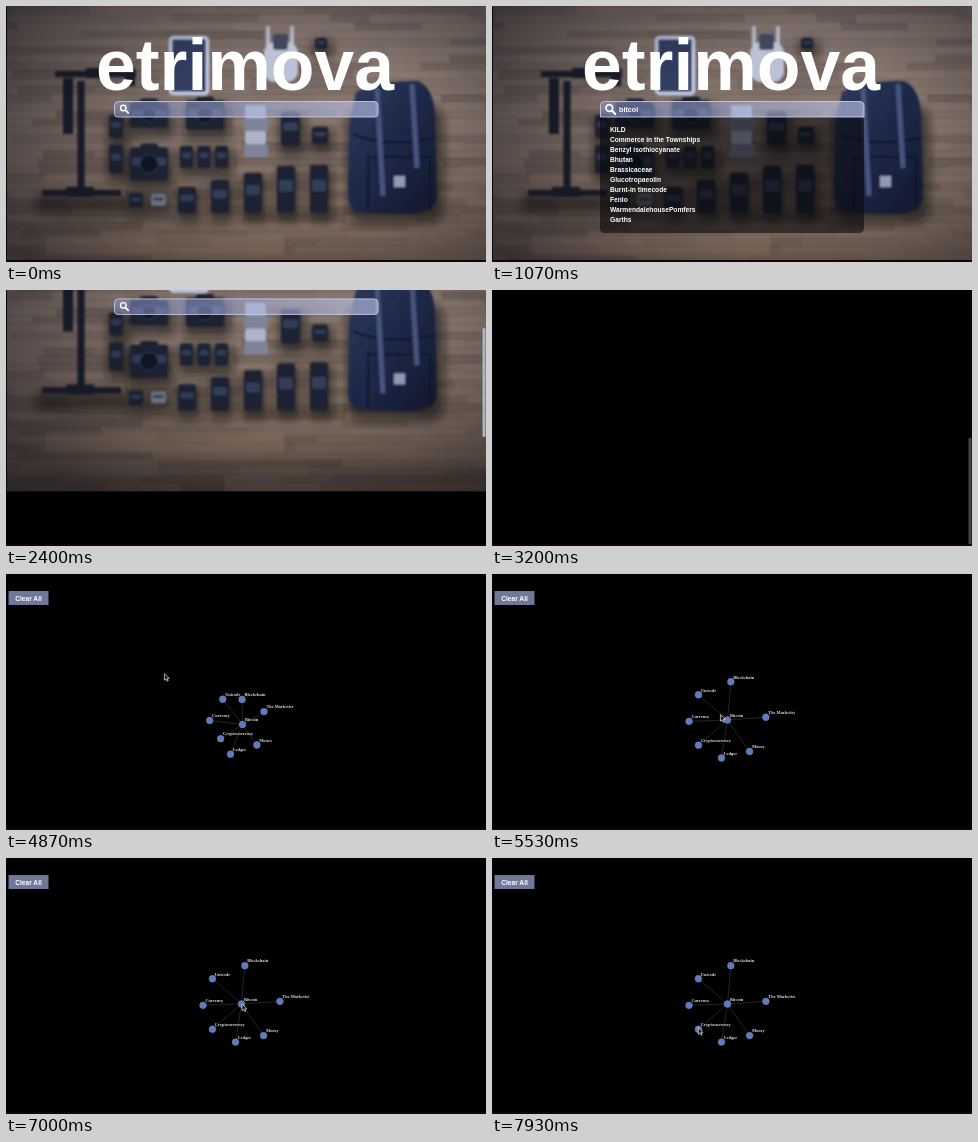
Recreate the animation shown at these times as an HTML page. Size 480x256 px, loop 8 s.

```html
<!DOCTYPE html>
<html lang="en">
<head>
<meta charset="utf-8">
<title>Search and graph</title>
<style>
  html, body { margin: 0; width: 100%; height: 100%; overflow: hidden; background: #000; }
  svg { display: block; width: 480px; height: 256px; }
  text { font-family: "Liberation Sans", Arial, sans-serif; font-weight: bold; fill: #fff; }
  .title { font-size: 71.5px; }
  .query { font-size: 7.2px; }
  .item { font-size: 6.67px; }
  .label { font: bold 4.36px "Liberation Serif", "Times New Roman", serif; fill: #dcdcdc; }
  .link { stroke: #3b3b3b; stroke-width: .6; }
  .node { fill: #5f7abd; stroke: #8090b8; stroke-width: .4; }
</style>
</head>
<body>
<svg viewBox="0 0 480 256">
  <defs>
    <linearGradient id="wood" x2="0" y2="1">
      <stop offset="0" stop-color="#7b6d67"/>
      <stop offset=".5" stop-color="#84736a"/>
      <stop offset=".86" stop-color="#7c6859"/>
      <stop offset="1" stop-color="#59493f"/>
    </linearGradient>
    <radialGradient id="vignette" cx=".6" cy=".42" r=".72">
      <stop offset=".4" stop-color="#15131a" stop-opacity="0"/>
      <stop offset="1" stop-color="#15131a" stop-opacity=".62"/>
    </radialGradient>
    <linearGradient id="bag" x2="1" y2="1">
      <stop offset="0" stop-color="#2f3b5e"/>
      <stop offset=".5" stop-color="#1d2747"/>
      <stop offset="1" stop-color="#131a31"/>
    </linearGradient>
    <linearGradient id="field">
      <stop offset="0" stop-color="#8893cc" stop-opacity=".52"/>
      <stop offset="1" stop-color="#c3c9ea" stop-opacity=".62"/>
    </linearGradient>
    <filter id="soft" x="-5%" y="-5%" width="110%" height="110%"><feGaussianBlur stdDeviation=".8"/></filter>
    <filter id="haze" x="-20%" y="-20%" width="140%" height="140%"><feGaussianBlur stdDeviation="5"/></filter>
    <clipPath id="photo"><rect width="480" height="288"/></clipPath>
  </defs>
  <g id="page">
    <g clip-path="url(#photo)">
      <rect width="480" height="288" fill="url(#wood)"/>
      <g id="boards" filter="url(#soft)"></g>
      <g id="shade" filter="url(#haze)" opacity=".55" fill="#0b0a10">
        <rect x="30" y="188" width="95" height="20"/>
        <rect x="340" y="100" width="98" height="118" rx="16"/>
      </g>
      <g id="things" filter="url(#soft)">
        <!-- stabiliser -->
        <g fill="none" stroke="#181b2a">
          <path d="M49 68H130M36 187H115" stroke-width="6"/>
          <path d="M75 75V190" stroke-width="7"/>
          <path d="M62 72V128M80 67H102M124 62V80M60 186H88" stroke-width="10"/>
        </g>
        <!-- tablet and controller -->
        <rect x="164.500" y="31.500" width="37" height="56" rx="3" fill="#323e62" stroke="#c3cce8" stroke-width="3.500"/>
        <path d="M262 20V44M286 20V44" stroke="#b6bbcc" stroke-width="4"/>
        <rect x="258" y="36" width="34" height="40" rx="11" fill="#bcc2d6"/>
        <rect x="267" y="28" width="15" height="16" rx="3" fill="#3f4760"/>
        <!-- backpack -->
        <path fill="url(#bag)" d="M350 86Q372 74 412 75Q428 82 429 110L431 192Q428 208 404 208L356 207Q342 204 342 188L343 122Z"/>
        <path fill="none" stroke="#0f1528" stroke-width="2" d="M347 128Q380 142 428 132M362 204V151H424V204"/>
        <path fill="none" stroke="#46557f" stroke-width="5" d="M371 82L377 190M406 78L411 162"/>
        <rect x="388" y="170" width="11" height="11" fill="#8f9ab8"/>
      </g>
      <rect width="480" height="288" fill="url(#vignette)"/>
    </g>
    <text class="title" x="90" y="84">etrimova</text>
    <g id="panel">
      <path d="M108 111H372V222Q372 227 367 227H113Q108 227 108 222Z" fill="#08070c" fill-opacity=".58"/>
    </g>
    <path id="bar" fill="url(#field)" stroke="#c6cbe6" stroke-width=".9"/>
    <g id="lens" fill="none" stroke="#fff" stroke-linecap="round">
      <circle r="2.900" stroke-width="1.400"/>
      <path d="M2.400 2.400L5.200 5.200" stroke-width="1.900"/>
    </g>
    <text id="query" class="query" x="127" y="106"></text>
  </g>
  <rect id="thumb" x="476.500" width="3" height="109" rx="1.500" fill="#b0b2c8"/>
  <g id="graph">
    <rect x="2.500" y="17" width="40" height="14" fill="#71769b"/>
    <text x="22.500" y="26.500" font-size="6.650" text-anchor="middle">Clear All</text>
  </g>
  <path id="cursor" d="M0 0V6.600L1.600 5.200L2.700 7.600L3.800 7.100L2.800 4.800H4.800Z" fill="#111" stroke="#e8e8e8" stroke-width=".7"/>
  <rect y="254" width="480" height="2" fill="#14040a"/>
  <rect width="1" height="256" fill="#08070a"/>
</svg>
<script>
const LOOP = 8000;
const $ = id => document.getElementById(id);

function set(el, attrs) {
  for (const k in attrs) el.setAttribute(k, attrs[k]);
}
function add(parent, tag, attrs, text) {
  const el = document.createElementNS("http://www.w3.org/2000/svg", tag);
  set(el, attrs);
  if (text) el.textContent = text;
  return parent.appendChild(el);
}
const box = (parent, x, y, width, height, rx, fill) =>
  add(parent, "rect", { x, y, width, height, rx, fill });

// ---- backdrop ----
let seed = 11;
const rand = () => (seed = (seed * 16807) % 2147483647) / 2147483647;

const boards = $("boards"), PLANK = 8;
for (let y = 0; y < 288; y += PLANK) {
  for (let x = -rand() * 90; x < 480;) {
    const width = 40 + rand() * 100, tone = rand() - .5;
    add(boards, "rect", { x, y, width, height: PLANK,
      fill: tone > 0 ? "#c8ae9c" : "#1a1415", opacity: Math.abs(tone) * .26 });
    x += width;
  }
  add(boards, "rect", { x: 0, y, width: 480, height: .8, fill: "#1b1515", opacity: .22 });
}
add(boards, "rect", { x: 40, y: 230, width: 238, height: 19, fill: "#b79a82", opacity: .28 });

const things = $("things");

// a dark piece of kit with a soft shadow and a lighter band
function kit(x, y, w, h, fill = "#1b2033") {
  box($("shade"), x - 2, y + 2, w + 8, h + 8, 4);
  box(things, x, y, w, h, 3, fill);
  box(things, x + 2, y + h * .3, w - 4, h * .25, 2, "#333d5a");
}
function camera(cx, cy, h) {
  kit(cx - 19, cy - h / 2, 38, h);
  box(things, cx - 9, cy - h / 2 - 4, 18, 9, 3, "#1b2033");
  add(things, "circle", { cx, cy, r: h * .28, fill: "#0f1320", stroke: "#35415f" });
}
camera(143, 109, 25);
camera(199, 109, 29);
camera(143, 158, 33);
for (let i = 0; i < 5; i++) {
  const h = Math.min(48, 26 + i * 7);
  kit(172 + i * 33, 207 - h, 18, h);
}
for (let i = 0; i < 3; i++) kit(174 + i * 17.5, 140, 13, 22);
for (let i = 0; i < 2; i++) kit(103, 109 + i * 30, 14, 23 + i * 5);
kit(275, 106, 19, 34);
kit(306, 121, 16, 17);
kit(309, 32, 12, 11);
kit(123, 187, 14, 15);
kit(145, 188, 15, 12, "#787e92");
for (let i = 0; i < 4; i++) {
  box(things, 239 - i % 2, 99 + i * 13, 21 + i % 2 * 3, 13, 2, i % 2 ? "#7d849a" : "#aeb4c8");
}

// ---- search ----
const first = ["KILD", "Commerce in the Townships", "Benzyl isothiocyanate", "Bhutan",
  "Brassicaceae", "Glucotropaeolin", "Burnt-in timecode", "Fenlo",
  "WarmendalehousePomfers", "Garths"];
const second = ["Bitcoin", "History of bitcoin", "Bitcoin Cash",
  "Legality of bitcoin by country or territory", "Cryptocurrency", "Bitcoin network",
  "Haruki Minasawa", "Litecoin", "Bitcoin Core", "List of bitcoin companies"];
const rows = first.map((_, i) =>
  add($("panel"), "text", { class: "item", x: 118, y: 126.2 + i * 10 }));
const TYPE = 130, KEY = 178, LIST = 600, REFRESH = 1400, PICK = 2130;

function drawSearch(t) {
  const open = t >= TYPE && t < PICK;
  const listed = t >= LIST && t < PICK;
  const typed = open ? 1 + Math.floor((t - TYPE) / KEY) : 0;
  $("query").textContent = "bitcoin".slice(0, typed);
  $("panel").style.display = listed ? "" : "none";
  const names = t < REFRESH ? first : second;
  rows.forEach((row, i) => { row.textContent = names[i]; });
  const r = listed ? 0 : 3.5;
  set($("bar"), { d: `M108.5 99.5q0 -4 4 -4H368q4 0 4 4V${111 - r}q0 ${r} ${-r} ${r}H${108.5 + r}q${-r} 0 ${-r} ${-r}Z` });
  set($("lens"), { transform: `translate(117.3 102) scale(${open ? 1.15 : .95})` });
}

// ---- motion helpers ----
const clamp = u => Math.min(1, Math.max(0, u));
const span = (t, a, b) => clamp((t - a) / (b - a));
const smooth = u => u * u * (3 - 2 * u);
const mix = (a, b, u) => a + (b - a) * u;

// ---- scroll ----
const BEGIN = 2337, END = 2530, DEPTH = 337;

function drawScroll(t) {
  const shift = DEPTH * smooth(span(t, BEGIN, END));
  set($("page"), { transform: `translate(0 ${-shift})` });
  set($("thumb"), { y: shift * .4375, opacity: t < BEGIN ? 0 : 1 - span(t, 3090, 3270) });
}

// ---- graph ----
const SHOW = 4870, SETTLED = 5670, PULLED = 6270, FREED = 7000;
const RING = 38.5, STIFF = .5;
const PULL = { x: 6, y: -5 };

// first angle, first radius, resting angle
const spokes = {
  Blockchain: [-91, 25, -85],
  "The Marketist": [-31, 25, -4],
  Money: [55, 25, 55],
  Ledger: [112, 32, 99],
  Cryptocurrency: [147, 26, 139],
  Currency: [187, 33, 178],
  Unicode: [232, 32, 221]
};
const graph = $("graph");
const nodes = ["Bitcoin", ...Object.keys(spokes)].map(name => ({ name, spoke: spokes[name] }));
for (const n of nodes) n.link = add(graph, "line", { class: "link" });
for (const n of nodes) n.dot = add(graph, "circle", { class: "node", r: 3.4 });
for (const n of nodes) n.label = add(graph, "text", { class: "label" }, n.name);

// outer nodes give way as the hub is dragged towards them
function place(spoke, centre, drag, grow) {
  const [a0, r0, a1] = spoke;
  const a = mix(a0, a1, grow) * Math.PI / 180;
  const [c, s] = [Math.cos(a), Math.sin(a)];
  const r = mix(r0, RING, grow) - STIFF * (c * drag.x + s * drag.y);
  return { x: centre.x + c * r, y: centre.y + s * r };
}

function drawGraph(t) {
  graph.style.display = t >= SHOW ? "" : "none";
  const grow = 1 - (1 - span(t, SHOW, SETTLED)) ** 3;
  const pull = smooth(span(t, SETTLED, PULLED)) - smooth(span(t, PULLED, FREED));
  const centre = { x: mix(236.5, 235.5, grow), y: mix(150.5, 146, grow) };
  const drag = { x: PULL.x * pull, y: PULL.y * pull };
  const hub = { x: centre.x + drag.x, y: centre.y + drag.y };
  for (const n of nodes) {
    const p = n.spoke ? place(n.spoke, centre, drag, grow) : hub;
    set(n.dot, { cx: p.x, cy: p.y });
    set(n.label, { x: p.x + 2.4, y: p.y - 3.2 });
    set(n.link, { x1: hub.x, y1: hub.y, x2: p.x, y2: p.y });
  }
}

// ---- pointer: time, x, y ----
const stops = [[4950, 158.4, 99.6], [5670, 236, 145], [PULLED, 247.6, 139],
  [FREED, 236, 146], [7470, 206.2, 169.6]];

function drawPointer(t) {
  let [, x, y] = stops[0];
  for (let i = 1; i < stops.length; i++) {
    const u = smooth(span(t, stops[i - 1][0], stops[i][0]));
    x = mix(x, stops[i][1], u);
    y = mix(y, stops[i][2], u);
  }
  set($("cursor"), { transform: `translate(${x} ${y})`, opacity: span(t, 4220, 4600) });
}

function frame() {
  const t = performance.now() % LOOP;
  drawSearch(t);
  drawScroll(t);
  drawGraph(t);
  drawPointer(t);
  requestAnimationFrame(frame);
}
frame();
</script>
</body>
</html>
```
